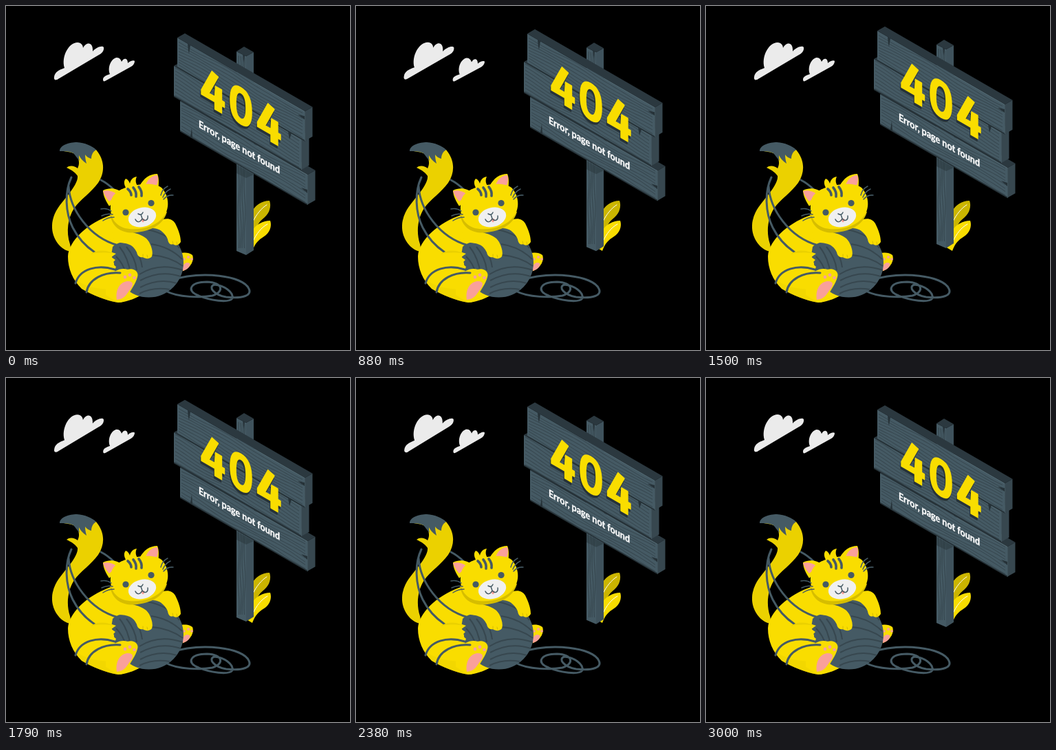
Write an HTML page that moves like this. It is 500 px wide and 500 px high and loops after 3040 ms.

```html
<!DOCTYPE html>
<html lang="en">
<head>
<meta charset="utf-8">
<title>404</title>
<style>
  html, body { margin: 0; width: 100%; height: 100%; overflow: hidden; background: #000; }
  svg { display: block; width: 100vw; height: 100vh; }
  text { font-family: Lato, "Open Sans", sans-serif; font-weight: 700; }
  .line { fill: none; stroke: #455a64; stroke-width: 3; stroke-linecap: round; stroke-linejoin: round; }
  .thin { stroke-width: 1.5; }
  .body { fill: #f9dd00; }
  .shade { fill: #ebd100; }
  .deep { fill: #d6bd00; }
  .dark { fill: #455a64; }
  .pink { fill: #f9a09a; }
  .grain { fill: none; stroke: #37474f; stroke-width: 1.1; }
  .crack { fill: #263238; }
</style>
</head>
<body>
<svg viewBox="0 0 500 500">
  <defs>
    <path id="four" stroke-width="1.4" d="M16 -53L25 -50L11.500 -18.500H20L21 -34H30V-18.500H34V-10.500H30V0H20V-10.500H0.500V-17Z"/>
    <g id="digits" stroke-linejoin="round">
      <use href="#four"/>
      <path fill="none" stroke-width="9.600" d="M58 -49.500C66.500 -49.500 69.500 -40 69.500 -26.700S66.500 -4 58 -4S46.500 -13.500 46.500 -26.700S49.500 -49.500 58 -49.500Z"/>
      <use href="#four" x="81.500"/>
    </g>
  </defs>

  <g id="clouds" fill="#ebebeb">
    <path d="M70 103C71 96 77 93 85 90C80 74 91 53 104 53C109 53 112 57 112 61C116 52 127 51 126 66C131 60 140 57 142 60C143 65 139 69 135 71L76 106C72 109 69 107 70 103Z"/>
    <path d="M141 107C141 103 145 101 151 99C147 89 153 76 161 75C165 75 167 78 168 81C171 75 177 75 177 83C180 80 186 78 187 80C187 84 184 87 182 88L146 108C143 110 141 110 141 107Z"/>
  </g>

  <g id="leaves">
    <path fill="#cbb500" d="M357 335V300C361 290 372 283 383 283C386 291 383 301 376 307C370 312 364 317 360 335Z"/>
    <path class="body" d="M358 356L348 350L357 328C363 317 374 312 384 312C387 320 383 330 375 335C367 340 362 345 358 356Z"/>
    <path class="line" style="stroke:#fff;stroke-width:1" d="M359 313C364 303 371 294 379 289M359 342C364 331 371 322 380 317"/>
  </g>

  <g id="sign">
    <path fill="#455a64" d="M335 66L349 73V362L335 356Z"/>
    <path fill="#3f525c" d="M349 73L360 67V355L349 362Z"/>
    <path fill="#2b383f" d="M335 66L346 59L360 67L349 73Z"/>
    <path class="crack" d="M344 70L347 72L346 83Z"/>
    <path id="postGrain" class="grain"/>
    <path fill="#263238" opacity=".45" d="M335 231L360 245L349 250L335 243Z"/>
    <g id="boards"></g>
    <g class="crack">
      <path d="M264 55L268 57L266 69L265 65Z"/>
      <path d="M434 165L424 158L434 160Z"/>
      <path d="M410 182L415 185L412 194Z"/>
      <path d="M268 190L271 191L270 177Z"/>
      <path d="M438 272L429 264L438 267Z"/>
    </g>
    <use href="#digits" fill="#263238" stroke="#263238" transform="matrix(1 .577 0 1 282.5 142)"/>
    <use href="#digits" fill="#f9dd00" stroke="#f9dd00" transform="matrix(1 .577 0 1 283.5 138.5)"/>
    <text fill="#fff" stroke="#fff" stroke-width=".4" font-size="14.500" transform="matrix(.866 .5 0 1 280 176)">Error, page not found</text>
  </g>

  <g id="cat">
    <path class="line" d="M138 253Q148 258 158 268"/>
    <path class="shade" d="M79 210C90 207 110 206 131 209L134 213C143 226 144 242 134 257C124 271 108 281 99 294C90 308 87 328 93 346L95 357C80 356 66 338 67 319C68 299 80 288 89 276C98 265 105 254 104 247C99 240 94 238 88 235C92 231 100 232 104 236C107 230 107 224 102 216C96 212 88 212 79 210Z"/>
    <path class="dark" d="M78 211C78 202 92 198 103 198C115 199 125 203 131 209C126 212 124 217 124 222C120 221 117 219 115 216C115 221 116 225 117 229C111 225 108 221 106 217C106 220 106 222 107 225C103 221 101 217 98 214C92 211 85 211 78 211Z"/>
    <path class="body" d="M90 364C91 342 118 315 155 303L225 305L235 400C205 415 185 430 163 431C145 428 125 420 110 411C97 398 90 382 90 364Z"/>
    <path class="shade" opacity=".5" d="M97 394C112 408 135 413 164 412L162 431C145 428 125 420 110 411Z"/>
    <path class="shade" d="M153 313C166 332 207 334 224 314L222 322C205 338 168 334 153 313Z"/>
    <path class="line" d="M95 249C85 270 86 300 97 322C105 338 117 350 129 358M91 262C93 295 120 336 163 348"/>
    <path class="body" d="M248 361C254 358 265 357 271 362C274 369 269 380 258 385L250 386Z"/>
    <path class="pink" d="M256 385C256 375 262 371 267 374C269 378 263 384 256 385Z"/>
    <g class="pink"><circle cx="259" cy="368" r="1.8"/><circle cx="265" cy="365" r="2"/><circle cx="270" cy="368" r="1.8"/></g>

    <path class="line" d="M232 414C250 424 284 424 300 421C318 415 315 402 292 401C268 401 261 414 280 421C296 428 324 432 329 425C331 416 317 406 303 405C293 408 302 420 320 423C345 426 358 420 353 411C345 392 285 384 238 399"/>
    <circle class="dark" cx="207.500" cy="373" r="50.500"/>
    <path class="dark" d="M155 350C165 341 178 342 190 348L175 377H158L153 362Z"/>
    <path class="grain" style="stroke-width:2" d="M206 325Q238 332 252 352M211 346Q238 350 256 368M212 362Q238 364 257 378M165 350Q178 366 181 390M175 350Q188 366 190 384M186 350Q196 364 198 380M194 390Q222 372 257 384M195 399Q224 383 254 393M195 409Q222 395 248 403M194 418Q214 408 238 412M160 364Q170 374 174 388"/>

    <path class="body" d="M113 371C118 360 133 354 151 357L160 360L153 365L159 369L154 374L160 379L157 387C143 393 129 386 113 371Z"/>
    <path class="shade" d="M123 361C131 354 146 354 156 360C145 358 133 358 123 361Z"/>
    <path class="body" d="M145 396C158 384 167 380 177 383C185 380 194 386 191 394C188 405 182 411 178 420C174 429 169 432 161 430L145 420Z"/>
    <path class="pink" d="M161 427C159 414 164 402 176 400C185 399 186 405 181 411C175 419 173 426 161 427Z"/>
    <g class="pink"><circle cx="173" cy="394" r="2.4"/><circle cx="180" cy="391" r="2.4"/><circle cx="186.500" cy="395" r="2.3"/></g>
    <path class="line" d="M101 403C107 382 133 375 158 383M117 416C120 397 142 386 166 388"/>

    <path class="body" d="M151 317C174 330 200 328 208 343C212 351 214 358 212 364C209 368 203 368 199 365C194 366 191 363 190 358C184 345 174 344 158 344Z"/>
    <path class="body" d="M216 319C226 307 240 306 246 316C251 326 254 335 254 343C251 348 246 349 243 346C239 348 236 345 235 339C232 331 225 325 216 322Z"/>
    <path class="line" style="stroke:#d6bd00;stroke-width:1" d="M199 365V361M206 366L205 362M243 346L242 342M249 347L248 343"/>

    <path class="body" d="M150 291C146 285 141 276 141 268C151 263 162 265 170 272Z"/>
    <path class="pink" d="M150 284C145 279 142 272 141 269C149 267 157 270 163 275Z"/>
    <path class="body" d="M194 262C200 250 209 244 220 244C223 251 222 259 221 270Z"/>
    <path class="pink" d="M203 260C206 251 213 246 220 246C222 251 221 256 219 261Z"/>
    <path class="deep" d="M151 302C154 323 170 332 191 329C215 326 230 315 234 299Z"/>
    <path class="body" d="M152 290C152 275 162 268 174 264C193 258 216 256 226 264C236 274 239 292 230 305C218 322 192 327 173 323C157 318 151 306 152 290Z"/>
    <path class="body" d="M177 269C172 262 170 255 174 251C177 252 179 255 180 258C181 253 184 249 190 248C188 253 188 257 192 263Z"/>
    <path class="line" style="stroke-width:3.600" d="M177 266Q182 270 182 275M185 264Q190 270 189 277M193 263Q198 269 197 276"/>
    <g class="dark"><circle cx="174" cy="300" r="4.600"/><circle cx="211" cy="286.500" r="4.600"/></g>
    <ellipse cx="198" cy="307" rx="20.500" ry="14" fill="#f0f0f0" transform="rotate(-14 198 307)"/>
    <path class="pink" d="M196 310L201 309C202 313 200 315 198 314Z"/>
    <path class="line thin" d="M192 302Q197 305 199 300M196 303L198 309C195 315 190 315 188 310M198 309C202 314 207 311 206 305"/>
    <path class="line thin" d="M153 298Q146 293 138 295M155 303Q147 301 139 305M157 307Q148 307 141 312M225 275Q227 266 235 262M228 278Q231 270 239 266M229 281Q235 274 243 275"/>
  </g>
</svg>
<script>
const PERIOD = 3000, HOLD = 40, SLOPE = 0.577;
const byId = id => document.getElementById(id);
const clouds = byId('clouds'), sign = byId('sign');

// Wavy strands running along a plank.
function grain(width, height, seed) {
  let d = '';
  for (let y = 4; y < height - 2; y += 4.6) {
    for (let x = 2; x <= width - 2; x += 6) {
      const bend = 1.8 * Math.sin(x / 23 + seed + y / 13) + 0.6 * Math.sin(x / 11 + y * seed);
      const wavy = Math.max(1, Math.min(height - 1, y + bend));
      d += (x === 2 ? 'M' : 'L') + x + ' ' + wavy.toFixed(1);
    }
  }
  return d;
}

function board(x, y, height, seed) {
  const w = 185.5, dx = 11, dy = 6.3, drop = w * SLOPE;
  return `<g transform="matrix(1 ${SLOPE} 0 1 ${x} ${y})">
      <rect class="dark" width="${w}" height="${height}"/>
      <path class="grain" d="${grain(w, height, seed)}"/>
      <path d="M0 ${height}H${w}" stroke="#263238" stroke-width="2"/>
      <path d="M${w * 0.6} .5H${w}V${height}" fill="none" stroke="#607780" stroke-width=".6"/>
    </g>
    <path fill="#2b383f" d="M${x} ${y}l${dx} ${-dy}l${w} ${drop}l${-dx} ${dy}z"/>
    <path fill="#37474f" d="M${x + w} ${y + drop}l${dx} ${-dy}v${height}l${-dx} ${dy}z"/>`;
}

byId('boards').innerHTML =
  board(253, 138, 43.5, 2.3) + board(244, 87, 44, 4.1) + board(249, 46, 43, 1.2);

byId('postGrain').setAttribute('d', [338, 341, 344, 347].map((x, i) =>
  `M${x} ${72 + i}` + Array.from({ length: 28 }, (_, k) =>
    `L${(x + Math.sin(k * 0.8 + i)).toFixed(1)} ${82 + k * 10}`).join('')).join(''));

function draw(time) {
  const p = Math.min(1, time % (PERIOD + HOLD) / PERIOD);
  const lift = -10 * (1 - Math.abs(1 - 2 * p));
  const sway = p < 0.25 ? 4 * p : p < 0.75 ? 2 - 4 * p : 4 * p - 4;
  sign.setAttribute('transform', `translate(0 ${lift})`);
  clouds.setAttribute('transform', `rotate(${sway} 128.5 81)`);
}

const start = performance.now();
function tick() {
  draw(performance.now() - start);
  requestAnimationFrame(tick);
}
tick();
</script>
</body>
</html>
```
